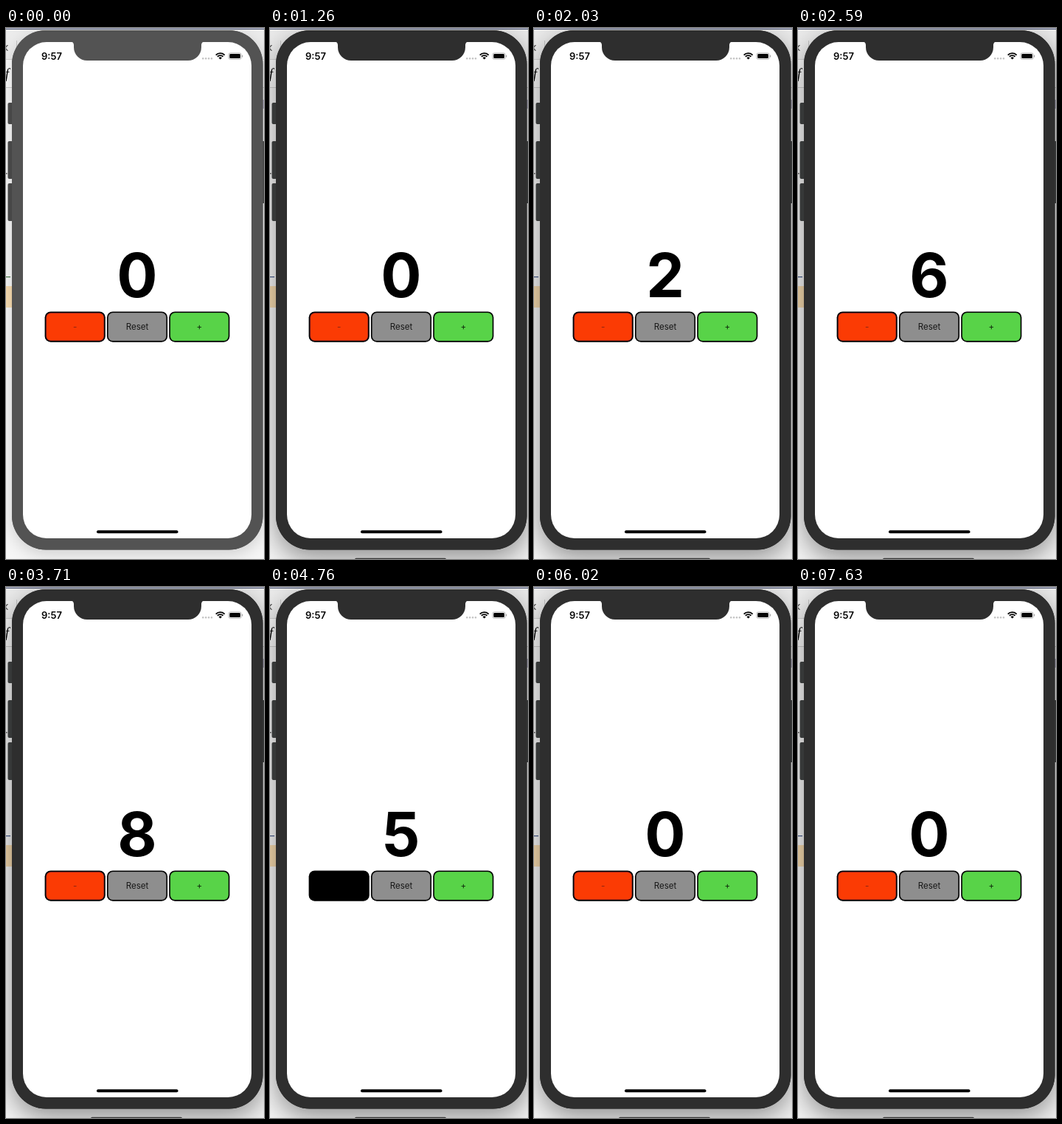
An HTML page with a canvas that plays this animation: 350x718 px, repeating every 7700 ms.

```html
<!DOCTYPE html>
<html lang="en">
<head>
<meta charset="utf-8">
<title>Counter</title>
<style>
html, body { margin: 0; width: 100%; height: 100%; overflow: hidden; background: #e4e4e4; }
canvas { display: block; width: 350px; height: 718px; }
</style>
</head>
<body>
<canvas id="stage"></canvas>
<script>
const W = 350, H = 718, LOOP = 7700, FOCUS_AT = 1260;
const canvas = document.getElementById('stage');
const ctx = canvas.getContext('2d');
const scale = window.devicePixelRatio || 1;
canvas.width = W * scale;
canvas.height = H * scale;

// [time, value shown from then on]
const COUNTS = [
  [0, 0], [1820, 1], [1960, 2], [2100, 3], [2240, 4], [2380, 5], [2590, 6], [2730, 7], [2940, 8],
  [4200, 7], [4550, 6], [4760, 5], [4900, 4], [5040, 3], [5180, 2], [5950, 0]
];
const BUTTON = { left: 52.6, top: 383.5, width: 82.2, height: 41.2, pitch: 84.3 };
const BUTTONS = [
  { label: '-', fill: '#fb3b04', ink: '#8b2411', rim: '#7c1c28', presses: [[4200, 4270], [4760, 4830]] },
  { label: 'Reset', fill: '#8e8e8e', ink: '#171717', rim: '#7c7c7c', presses: [[5880, 6020]] },
  { label: '+', fill: '#58d348', ink: '#102b0c', rim: '#4dbb40', presses: [[1820, 1890], [2100, 2170]] }
];

function rect(x, y, w, h, fill) {
  ctx.fillStyle = fill;
  ctx.fillRect(x, y, w, h);
}

function rounded(x, y, w, h, r, fill) {
  ctx.beginPath();
  ctx.roundRect(x, y, w, h, r);
  ctx.fillStyle = fill;
  ctx.fill();
}

function text(str, x, y, font, fill, align = 'center') {
  ctx.font = font;
  ctx.textAlign = align;
  ctx.fillStyle = fill;
  ctx.fillText(str, x, y);
}

function drawDesktop(focused) {
  rect(0, 0, W, H, '#f6f6f6');
  rect(0, 2, W, 78, '#ececec');
  rect(0, 0, W, 1, '#c9cbdc');
  rect(0, 1, W, 1, '#46506c');
  rect(0, 42, W, 1, '#d2d2d2');
  rect(0, 43, W, 37, '#fafafa');
  rect(0, 80, W, 1, '#cfcfcf');
  rect(0, 349, 9, 29, '#f8dcb0');
  text('‹', 0.5, 32, '17px Inter, sans-serif', '#555');
  rect(14, 17, 1, 9, '#c4c4c4');
  text('f', 1.5, 68, 'italic 18px "Liberation Serif", serif', '#000');
  rect(0, 196, 1.5, 1.5, '#555');
  rect(0, 336, 6, 1.2, focused ? '#43598c' : '#4c7c4c');
  rect(348, 97, 2, 12, '#b9b7c9');
}

function drawBody(focused) {
  const color = focused ? '#2e2e2e' : '#535353';
  const side = focused ? '#363838' : '#474747';
  ctx.save();
  ctx.shadowColor = focused ? 'rgba(0,0,0,.42)' : 'rgba(0,0,0,.16)';
  ctx.shadowBlur = (focused ? 36 : 22) * scale;
  ctx.shadowOffsetY = (focused ? 12 : 6) * scale;
  rounded(8, 3, 340.5, 702.5, 46, color);
  ctx.restore();
  if (focused) rounded(115, 716.8, 124, 6, 2, '#3a3a3a');
  rounded(2.5, 101, 7, 29, 2, side);
  rounded(2.5, 153, 7, 51, 2, side);
  rounded(2.5, 210, 7, 51, 2, side);
  rect(347.5, 153, 2.5, 84, side);
  rounded(8, 3, 340.5, 702.5, 46, color);
  rounded(23, 19, 310, 671, 32, '#fff');

  ctx.beginPath();
  ctx.moveTo(86, 18);
  ctx.arcTo(92, 18, 92, 25, 5);
  ctx.arcTo(92, 44, 112, 44, 18);
  ctx.arcTo(265, 44, 265, 25, 18);
  ctx.arcTo(265, 18, 271, 18, 5);
  ctx.lineTo(271, 18);
  ctx.closePath();
  ctx.fillStyle = color;
  ctx.fill();
}

function drawStatus() {
  text('9:57', 48, 42.5, '600 13px Inter, sans-serif', '#050505', 'left');
  for (let i = 0; i < 4; i++) rounded(266 + i * 3.9, 40, 2.5, 2.5, 1, '#c4c4c4');

  ctx.strokeStyle = '#050505';
  ctx.lineWidth = 1.9;
  for (const r of [8.2, 5.2]) {
    ctx.beginPath();
    ctx.arc(290.7, 42.3, r, -Math.PI * 0.76, -Math.PI * 0.24);
    ctx.stroke();
  }
  ctx.beginPath();
  ctx.moveTo(290.7, 42.5);
  ctx.arc(290.7, 42.5, 3, -Math.PI * 0.76, -Math.PI * 0.24);
  ctx.fillStyle = '#050505';
  ctx.fill();

  ctx.beginPath();
  ctx.roundRect(302, 33.8, 17.2, 8.6, 2.4);
  ctx.strokeStyle = '#aaa';
  ctx.lineWidth = 0.8;
  ctx.stroke();
  rounded(303.3, 35.1, 14.6, 6, 1.3, '#050505');
  rounded(320, 36.6, 1.2, 3, 0.6, '#aaa');
}

function drawButton(button, index, time) {
  const { left, top, width, height, pitch } = BUTTON;
  const x = left + index * pitch;
  const layer = (inset, fill) =>
    rounded(x + inset, top + inset, width - 2 * inset, height - 2 * inset, 8 - inset, fill);
  layer(0, '#000');
  if (button.presses.some(([from, to]) => time >= from && time < to)) return;
  layer(1.6, button.rim);
  layer(2.3, button.fill);
  text(button.label, x + width / 2, 408.2, '11.6px Inter, sans-serif', button.ink);
}

function draw(time) {
  const focused = time >= FOCUS_AT;
  const count = COUNTS.findLast(([at]) => at <= time)[1];
  ctx.setTransform(scale, 0, 0, scale, 0, 0);
  drawDesktop(focused);
  drawBody(focused);
  drawStatus();
  text(String(count), 178, 363.5, '700 82px Inter, sans-serif', '#000');
  BUTTONS.forEach((button, index) => drawButton(button, index, time));
  rounded(123, 679.3, 110.5, 4, 2, '#000');
}

const start = performance.now();
function tick() {
  draw((performance.now() - start) % LOOP);
  requestAnimationFrame(tick);
}
tick();
</script>
</body>
</html>
```
